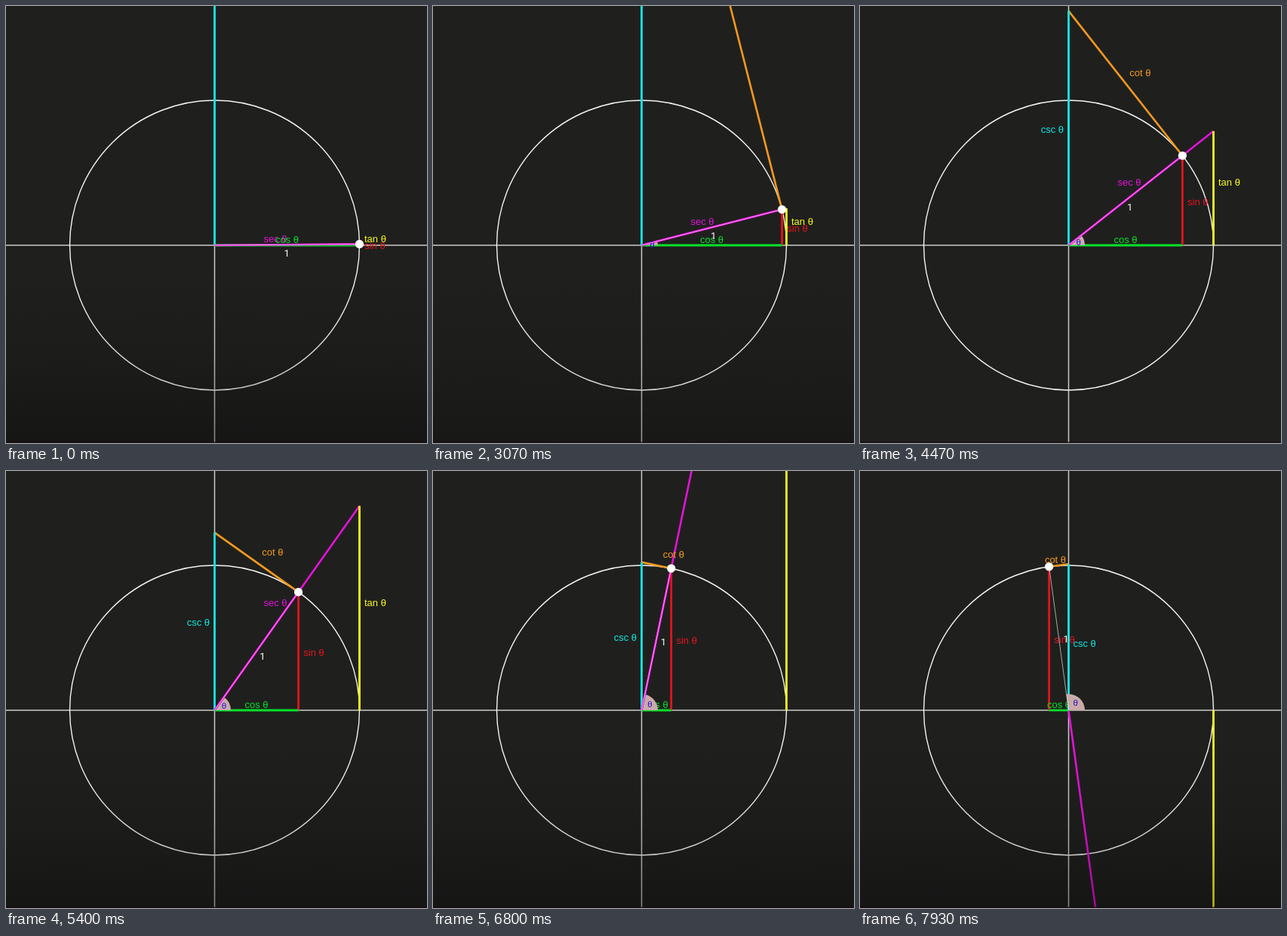
An HTML page with a canvas for the animation above (8 s loop, 558 px wide and 579 px high).

```html
<!DOCTYPE html>
<html lang="en">
<head>
<meta charset="utf-8">
<title>Trigonometric functions on the unit circle</title>
<style>
html, body { margin: 0; width: 100%; height: 100%; overflow: hidden; background: #1f201e; }
canvas { display: block; }
</style>
</head>
<body>
<canvas id="stage" width="558" height="579"></canvas>
<script>
const W = 558, H = 579, LOOP = 8000;
const CX = 276.5, CY = 317, R = 192;
const SANS = '"Liberation Sans", Arial, sans-serif';
const ctx = document.getElementById('stage').getContext('2d');

const color = {
  sin: '#e3141c', cos: '#06e229', tan: '#fbfb1c',
  cot: '#f5981f', csc: '#12e6e2', sec: '#e512d8',
  sector: '#c9abaa', theta: '#2711cf', axis: '#cbccc8'
};

// Time in ms and angle in radians; the turn is close to 0.3 rad/s.
const turn = [[2333, 0.025], [3800, 0.474], [4467, 0.667], [5400, 0.954], [6800, 1.365], [7933, 1.706]];

function angleAt(ms) {
  if (ms < 2330) return 0.008;
  for (let i = 1; i < turn.length; i++) {
    const [t0, a0] = turn[i - 1], [t1, a1] = turn[i];
    if (ms <= t1) return a0 + (a1 - a0) * (ms - t0) / (t1 - t0);
  }
  return turn[turn.length - 1][1];
}

const ramp = (t, from, to) => Math.min(1, Math.max(0, (t - from) / (to - from)));

function line(x0, y0, x1, y1, stroke, width = 2.8) {
  ctx.strokeStyle = stroke;
  ctx.lineWidth = width;
  ctx.beginPath();
  ctx.moveTo(x0, y0);
  ctx.lineTo(x1, y1);
  ctx.stroke();
}

function label(text, x, y, fill, align = 'left', font = '13px ' + SANS) {
  ctx.font = font;
  ctx.fillStyle = fill;
  ctx.textAlign = align;
  ctx.fillText(text, x, y);
}

function disc(x, y, r, fill) {
  ctx.fillStyle = fill;
  ctx.beginPath();
  ctx.arc(x, y, r, 0, 2 * Math.PI);
  ctx.fill();
}

function drawPlane() {
  ctx.fillStyle = '#1f201e';
  ctx.fillRect(0, 0, W, H);
  line(0, CY, W, CY, color.axis, 1.5);
  line(CX, 0, CX, H, color.axis, 1.5);
  ctx.strokeStyle = '#f4f4f2';
  ctx.lineWidth = 1.4;
  ctx.beginPath();
  ctx.arc(CX, CY, R, 0, 2 * Math.PI);
  ctx.stroke();
}

function drawFunctions(a, showCot) {
  const s = Math.sin(a), c = Math.cos(a), past = c < 0;
  const px = CX + R * c, py = CY - R * s;
  const tx = CX + R, ty = CY - R * Math.tan(a);
  const top = CY - R / s;
  const midX = (CX + px) / 2, midY = (CY + py) / 2;
  const tanMid = (CY + ty) / 2, cscMid = (CY + top) / 2, cotMid = (py + top) / 2;

  line(px, CY, px, py, color.sin);
  label('sin θ', px + 6.7, midY + 6, color.sin);

  line(CX, CY, tx, ty, color.sec, 2.6);
  label('sec θ', CX + R / 2, tanMid - 3, color.sec, 'right');

  line(CX, CY, px, CY, color.cos);
  label('cos θ', midX, CY - 3, color.cos, 'center');

  line(tx, CY, tx, ty, color.tan);
  label('tan θ', tx + 6.5, tanMid - 3, color.tan);

  if (showCot) {
    line(px, py, CX, top, color.cot, 2.6);
    if (past) label('cot θ', midX + 9.5, cotMid - 2.5, color.cot, 'right');
    else label('cot θ', midX + 9.5 * s - 0.6, cotMid - 9.5, color.cot);
  }

  line(CX, CY, CX, top, color.csc);
  if (past) label('csc θ', CX + 6, cscMid + 13, color.csc);
  else label('csc θ', CX - 6.5, cscMid + 6, color.csc, 'right');

  ctx.fillStyle = color.sector;
  ctx.beginPath();
  ctx.moveTo(CX, CY);
  ctx.arc(CX, CY, 21.5, 0, -a, true);
  ctx.fill();
  if (!past) line(CX, CY, px, py, color.sec, 2.6);
  if (a > 0.2) {
    label('θ', CX + 14 * Math.cos(a / 2), CY + 4.5 - 14 * Math.sin(a / 2),
      color.theta, 'center', '11.5px ' + SANS);
  }

  line(CX, CY, px, py, 'rgba(255,255,255,0.6)', 1);
  label('1', midX + 10 * s - 0.4, midY + 10 * c + 6, '#fff', 'center', '13px Roboto, sans-serif');
  disc(px, py, 5.6, '#fff');
}

function drawShade(alpha) {
  const g = ctx.createLinearGradient(0, 350, 0, H);
  g.addColorStop(0, 'rgba(0,0,0,0)');
  g.addColorStop(0.5, 'rgba(0,0,0,0.1)');
  g.addColorStop(1, 'rgba(0,0,0,0.32)');
  ctx.globalAlpha = alpha;
  ctx.fillStyle = g;
  ctx.fillRect(0, 350, W, H - 350);
  ctx.globalAlpha = 1;
  ctx.fillStyle = 'rgba(24,12,17,0.8)';
  ctx.fillRect(0, H - 1.5, W, 1.5);
}

function draw(now) {
  // Motion advances at 15 steps per second.
  const step = Math.floor(((now % LOOP) + 4) * 15 / 1000);
  const t = step * 1000 / 15;
  drawPlane();
  drawFunctions(angleAt(t), step >= 35);
  drawShade(1 - ramp(t, 3000, 3270) + ramp(t, 4600, 4800));
}

const start = performance.now();
function tick() {
  draw(performance.now() - start);
  requestAnimationFrame(tick);
}
tick();
</script>
</body>
</html>
```
